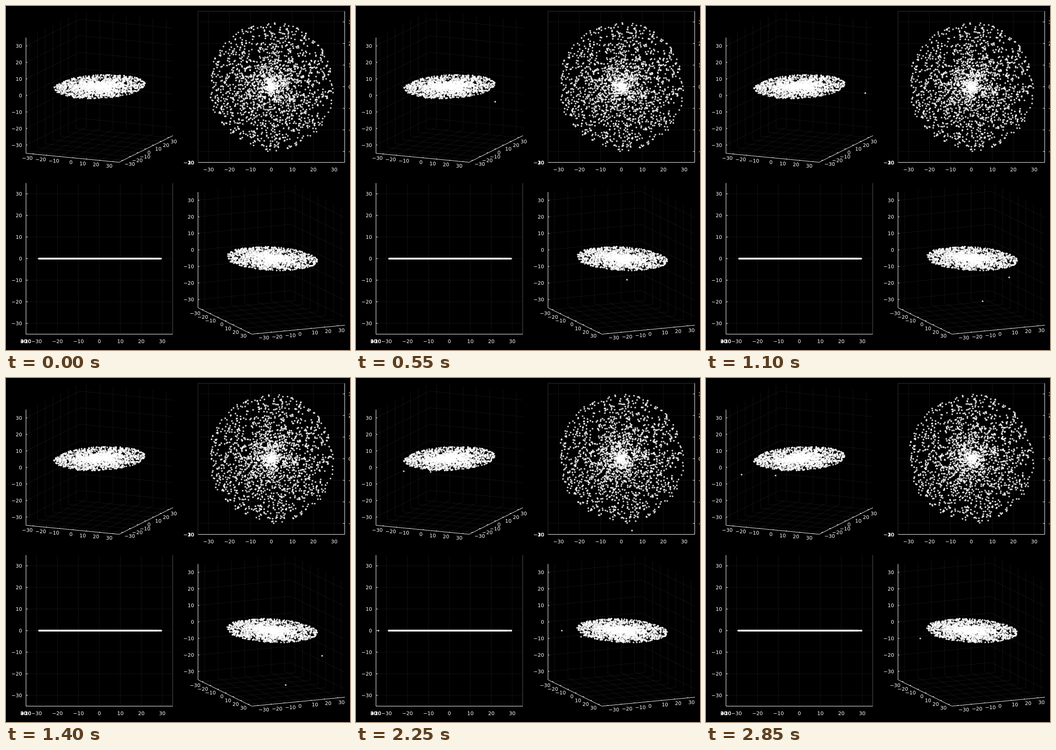
Write an HTML page with a canvas that moves like this. It is 748 px wide and 749 px high and loops after 2.9 s.

```html
<!DOCTYPE html>
<html lang="en">
<head>
<meta charset="utf-8">
<title>Star disc in four views</title>
<style>
html, body { margin: 0; width: 100%; height: 100%; overflow: hidden; background: #000; }
canvas { display: block; }
</style>
</head>
<body>
<canvas id="stage" width="748" height="749"></canvas>
<script>
const ctx = document.getElementById('stage').getContext('2d');
const LOOP = 2900, STEP = 50, LIM = 35, STARS = 2000, RADIUS = 30;
const TICKS = [-30, -20, -10, 0, 10, 20, 30];
const GRID = 'rgba(255,255,255,.075)';

// Each view: centre, screen vectors of the x and y axes, z scale, label offsets.
const corner = {
  c: [203.25, 175.5], x: [2.893, .279], y: [1.671, -.829], z: 3.6,
  left: 43.5, top: 11.5, xOff: [0, 9], yOff: [3, 8]
};
const above = { c: [577.1, 175.7], x: [4.557, 0], y: [0, -4.7], z: 0, left: 417.5, top: 11.5 };
const front = { c: [203.1, 550], x: [4.557, 0], y: [0, 0], z: 4.7, left: 43.5, top: 385.5 };
const side = {
  c: [577.25, 550], x: [1.671, .821], y: [2.893, -.279], z: 3.6,
  left: 417.5, top: 385.5, xOff: [-3, 7.5], yOff: [0, 9]
};
const views = [corner, above, front, side];
const W = 319, H = 329;

// Stars thrown out of the centre: velocity per ms and launch time.
const escapers = [
  [.0888, -.0436, 10],
  [.0567, -.0004, 224],
  [-.00565, -.01665, 0],
  [.00225, -.0148, 0],
  [-.069, -.08, 300],
  [-.0615, -.073, 1700]
];

let seed = 20;
function random() {
  seed = (seed + 0x6D2B79F5) | 0;
  let n = Math.imul(seed ^ seed >>> 15, 1 | seed);
  n = n + Math.imul(n ^ n >>> 7, 61 | n) ^ n;
  return ((n ^ n >>> 14) >>> 0) / 4294967296;
}

const stars = Array.from({ length: STARS }, () => ({
  r: .1 + (RADIUS - .1) * random(),
  angle: 2 * Math.PI * random()
}));

function project(v, x, y, z) {
  return [
    v.c[0] + x * v.x[0] + y * v.y[0],
    v.c[1] + x * v.x[1] + y * v.y[1] - z * v.z
  ];
}

function line(points, color) {
  ctx.strokeStyle = color;
  ctx.beginPath();
  for (const p of points) ctx.lineTo(...p);
  ctx.stroke();
}

// y is the middle of the digits.
function label(n, x, y, align) {
  ctx.textAlign = align;
  ctx.fillText(String(n).replace('-', '\u2212'), x, y + 4.2);
}

function clipped(v, draw) {
  ctx.save();
  ctx.beginPath();
  ctx.rect(v.left - .5, v.top - .5, W + 1, H + 1);
  ctx.clip();
  draw();
  ctx.restore();
}

function drawBox(v) {
  const p = (x, y, z) => project(v, x, y, z);
  clipped(v, () => {
    for (const t of TICKS) {
      line([p(-LIM, -LIM, t), p(-LIM, LIM, t), p(LIM, LIM, t)], GRID);
      line([p(t, -LIM, -LIM), p(t, LIM, -LIM), p(t, LIM, LIM)], GRID);
      line([p(LIM, t, -LIM), p(-LIM, t, -LIM), p(-LIM, t, LIM)], GRID);
    }
  });
  line([p(-LIM, -LIM, LIM), p(-LIM, -LIM, -LIM), p(LIM, -LIM, -LIM), p(LIM, LIM, -LIM)], '#fff');
  for (const t of TICKS) {
    const zTick = p(-LIM, -LIM, t), xTick = p(t, -LIM, -LIM), yTick = p(LIM, t, -LIM);
    line([zTick, [zTick[0] + 3, zTick[1]]], '#fff');
    line([xTick, p(t, -LIM + 1.2, -LIM)], '#fff');
    line([yTick, p(LIM - 1.2, t, -LIM)], '#fff');
    label(t, v.left - 8.5, zTick[1], 'right');
    label(t, xTick[0] + v.xOff[0], xTick[1] + v.xOff[1], 'right');
    label(t, yTick[0] + v.yOff[0], yTick[1] + v.yOff[1], 'left');
  }
}

function drawFlat(v) {
  const l = v.left, r = l + W, top = v.top, b = top + H, isTop = v === above;
  const scale = isTop ? -v.y[1] : v.z;
  for (const t of TICKS) {
    const x = v.c[0] + t * v.x[0], y = v.c[1] - t * scale;
    line([[x, top], [x, b]], GRID);
    line([[l, y], [r, y]], GRID);
    label(t, x, b + 15.5, 'center');
    if (isTop) {
      line([[r - 4, y], [r, y]], '#fff');
      label(t, r + 8, y, 'left');
      label(t, l - 8.5, b, 'right');
    } else {
      line([[l, y], [l + 4, y]], '#fff');
      label(t, l - 8.5, y, 'right');
      label(t, l - 12, b + 15.5, 'left');
    }
  }
  if (isTop) {
    line([[l, b], [l, top], [r, top]], '#333');
    line([[l, b], [r, b], [r, top]], '#fff');
  } else {
    line([[r, top], [r, b]], '#555');
    line([[l, top], [l, b], [r, b]], '#fff');
  }
}

// Orbital speed falls with the square root of the radius.
function positions(t) {
  const list = stars.map(({ r, angle }) => {
    const a = angle + .002 * Math.sqrt(30 / r) / r * t;
    return [r * Math.cos(a), r * Math.sin(a)];
  });
  for (const [vx, vy, start] of escapers)
    if (t > start) list.push([vx * (t - start), vy * (t - start)]);
  return list;
}

function draw(t) {
  ctx.fillStyle = '#000';
  ctx.fillRect(0, 0, 748, 749);
  ctx.fillStyle = '#fff';
  ctx.lineWidth = 1;
  ctx.font = '11px "DejaVu Sans", sans-serif';
  for (const v of views) (v.xOff ? drawBox : drawFlat)(v);

  const points = positions(t);
  ctx.fillStyle = 'rgba(255,255,255,.8)';
  for (const v of views) clipped(v, () => {
    for (const [x, y] of points) {
      ctx.beginPath();
      ctx.arc(...project(v, x, y, 0), 1.85, 0, 2 * Math.PI);
      ctx.fill();
    }
  });
}

const begin = performance.now();
let shown = -1;
function tick() {
  const t = Math.floor((performance.now() - begin) % LOOP / STEP) * STEP;
  if (t !== shown) draw(shown = t);
  requestAnimationFrame(tick);
}
tick();
</script>
</body>
</html>
```
